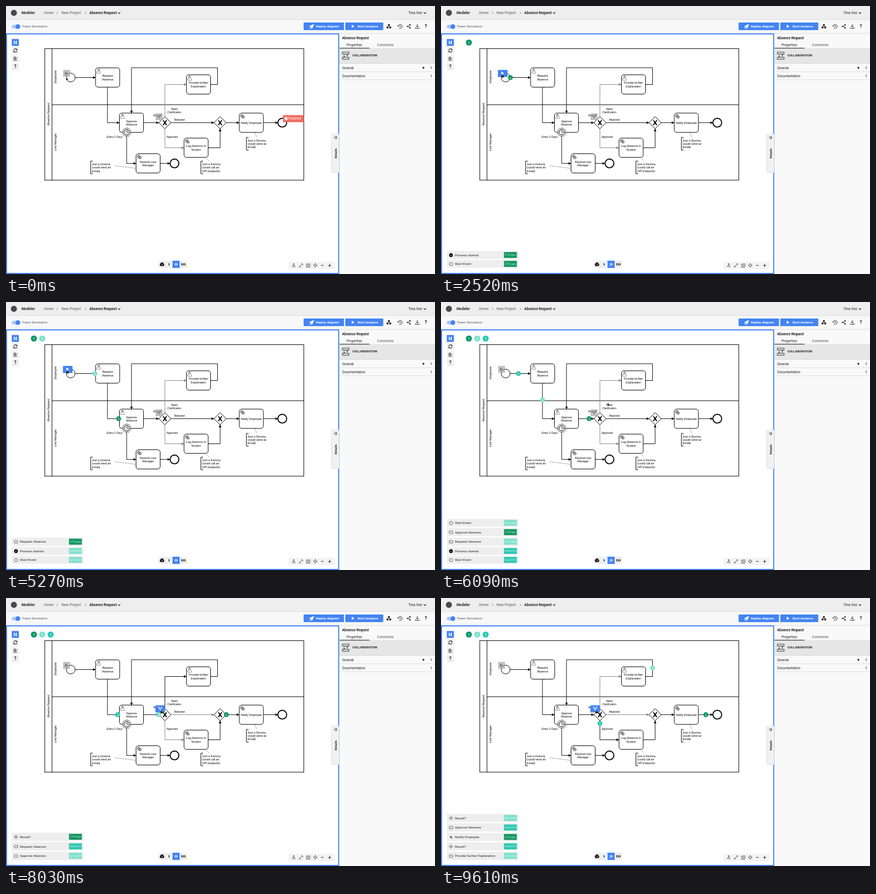
These frames come from a looping animation (800x500 px, 9640 ms). An HTML page:

```html
<!DOCTYPE html>
<html lang="en">
<head>
<meta charset="utf-8">
<title>Token simulation</title>
<style>
  html, body { margin: 0; width: 100%; height: 100%; overflow: hidden; background: #fff; }
  svg { display: block; width: 100vw; height: 100vh; }
  text { font-family: Roboto, "Open Sans", sans-serif; fill: #222; white-space: pre; }
  .bpmn text { font-family: "Liberation Sans", Arial, sans-serif; fill: #000; }
  text.mono { font-family: "Liberation Mono", "DejaVu Sans Mono", monospace; fill: #fff; }
</style>
</head>
<body>
<svg id="stage" viewBox="0 0 800 500"></svg>
<script>
const LOOP = 9640;
const BLUE = '#4383f4', INK = '#222', GREY = '#838383';
const stage = document.getElementById('stage');

// ---- drawing helpers -------------------------------------------------
const rect = (x, y, w, h, fill, extra = '') =>
  `<rect x="${x}" y="${y}" width="${w}" height="${h}" fill="${fill}" ${extra}/>`;
const circle = (x, y, r, fill, extra = '') =>
  `<circle cx="${x}" cy="${y}" r="${r}" fill="${fill}" ${extra}/>`;
const line = (d, stroke = INK, w = 1, extra = '') =>
  `<path d="${d}" fill="none" stroke="${stroke}" stroke-width="${w}" ${extra}/>`;
const shape = (d, fill = INK, extra = '') => `<path d="${d}" fill="${fill}" ${extra}/>`;
// y is the vertical middle of the capitals
const text = (x, y, s, size = 6.3, extra = '') =>
  `<text x="${x}" y="${y + size * 0.355}" font-size="${size}" ${extra}>${s}</text>`;
const MID = 'text-anchor="middle"', BOLD = 'font-weight="600"';
const at = (x, y, s, extra = '') => `<g transform="translate(${x} ${y})" ${extra}>${s}</g>`;
const lines = (x, y, rows, size, step, extra) =>
  rows.map((s, i) => text(x, y + i * step, s, size, extra)).join('');
const chevron = (x, y, color = INK, w = 1) => line(`M${x - 1.3} ${y - 2.3}l2.5 2.3l-2.5 2.3`, color, w);
const caret = (x, y) => line(`M${x - 2.2} ${y - 1.2}l2.2 2.3l2.2-2.3`, INK, 1.1);

// ---- model -----------------------------------------------------------
const flows = {
  start: [[129, 133.5], [167, 133.5]],
  request: [[189.2, 151.5], [189.2, 217.7], [211.5, 217.7]],
  approve: [[256.5, 217.7], [285, 217.7]],
  rejected: [[307.5, 217.7], [388, 217.7]],
  clarify: [[296.3, 206.5], [296.3, 146.5], [336.5, 146.5]],
  approved: [[296.3, 229], [296.3, 264.5], [332, 264.5]],
  log: [[377, 264.5], [399.3, 264.5], [399.3, 229]],
  merge: [[410.5, 217.7], [435, 217.7]],
  notify: [[480, 217.7], [507, 217.7]],
  provide: [[381.5, 146.5], [394.5, 146.5], [394.5, 115.2], [234, 115.2], [234, 200]],
  timer: [[225, 244], [225, 293.7], [242.5, 293.7]],
  remind: [[287.5, 293.7], [306, 293.7]]
};

// what the log says when a token leaves through a flow
const leaving = {
  start: ['event', 'Start Event'],
  request: ['task', 'Request Absence'],
  approve: ['task', 'Approve Absence'],
  rejected: ['gate', 'Result?'],
  clarify: ['gate', 'Result?'],
  approved: ['gate', 'Result?'],
  notify: ['gear', 'Notify Employee'],
  provide: ['task', 'Provide further Explanation']
};

const tokens = [
  { color: '#129660', id: '175cqws', legs: [['start', 2430], ['request', 3757], ['approve', 5365],
    ['rejected', 6530], ['merge', 7940], ['notify', 9050]], end: 10150 },
  { color: '#7fe0cc', id: '6ptyg6m', legs: [['start', 4180], ['request', 5417], ['approve', 6817],
    ['clarify', 8045], ['provide', 9440]], end: 11140 },
  { color: '#2cc7b1', id: '0e0pf2n', legs: [['start', 5572], ['request', 6755], ['approve', 8160],
    ['approved', 9380]], end: 10730 }
];

const events = tokens.flatMap(k => [
  { t: k.legs[0][1], kind: 'begin', name: 'Process started', k },
  ...k.legs.filter(([f]) => leaving[f]).map(([f, t]) => ({ t, kind: leaving[f][0], name: leaving[f][1], k }))
]).sort((a, b) => a.t - b.t);

// ---- diagram ---------------------------------------------------------
function flow(name) {
  const pts = flows[name], [x, y] = pts.at(-1), [px, py] = pts.at(-2);
  const turn = Math.atan2(y - py, x - px) * 180 / Math.PI;
  return `<g id="${name}" color="#000">` +
    line('M' + pts.join('L'), 'currentColor', 0.95, 'stroke-linejoin="round"') +
    `<path d="M.2 0l-4.9-2.4v4.8z" fill="currentColor" transform="translate(${x} ${y}) rotate(${turn})"/></g>`;
}

const gearAt = (x, y, r, bg = '#fff') =>
  circle(x, y, r, bg, `stroke="#333" stroke-width="${r * .5}" stroke-dasharray="${r * .42} ${r * .365}"`) +
  circle(x, y, r * .8, bg, 'stroke="#333" stroke-width=".6"') +
  circle(x, y, r * .35, bg, 'stroke="#333" stroke-width=".5"');
const person = line('M2.3 10v-2.2q.3-1.4 2.2-2h2.6q1.9.6 2.2 2v2.2z', '#333', .55) +
  circle(5.8, 4.2, 1.8, '#fff', 'stroke="#333" stroke-width=".55"') +
  shape('M4 3.9a1.8 1.8 0 0 1 3.6 0q-1.8-.9-3.6 0z', '#333');
const gears = gearAt(4.9, 5, 2.4) + gearAt(7.2, 7.2, 2.4);

const task = (x, y, icon, rows) => at(x, y,
  rect(0, 0, 45, 36, '#fff', 'rx="4.5" stroke="#000" stroke-width="1"') + icon +
  lines(22.5, 18.2 - (rows.length - 1) * 3.1, rows, 5.4, 6.2, MID));

const gateway = x => at(x, 217.7,
  shape('M0-11.3L11.3 0L0 11.3L-11.3 0z', '#fff', 'stroke="#000" stroke-width="1"') +
  line('M-3.2-4.4L3.2 4.4M3.2-4.4L-3.2 4.4', '#000', 1.9));

const note = (x, y, rows) => line(`M${x + 4} ${y}h-4v23.6h4`, '#000', 1) +
  lines(x + 2.3, y + 5.6, rows, 5.4, 6.3);

const upright = (x, y, s) => at(x, y, text(0, 0, s, 5.4, MID), 'style="rotate:0deg"')
  .replace(')"', ') rotate(-90)"').replace(' style="rotate:0deg"', '');

const clock = at(225, 235.6,
  circle(0, 0, 8, '#fff', 'stroke="#000" stroke-width=".8" stroke-dasharray="2.6 1.5"') +
  circle(0, 0, 6.5, 'none', 'stroke="#000" stroke-width=".7" stroke-dasharray="2.2 1.2"') +
  circle(0, 0, 4.8, '#fff', 'stroke="#000" stroke-width="1"') +
  line('M1.2-3.3L0 .2H2.8', '#000', .8));

const dotted = d => line(d, '#000', .9, 'stroke-dasharray=".9 1.6"');

const diagram = '<g class="bpmn">' +
  rect(72.3, 79.6, 483, 245.3, '#fff', 'stroke="#000" stroke-width="1"') +
  line('M85.8 79.6V325M85.8 184.2H555.3', '#000', 1) +
  upright(79, 202, 'Absence Request') + upright(92.3, 132, 'Employee') + upright(92.3, 254, 'Line Manager') +
  Object.keys(flows).map(flow).join('') +
  dotted('M203 298.2L242.5 302.8') + dotted('M372.5 282.5L379 290') + dotted('M463.8 236L467.5 244') +
  circle(120.6, 133.5, 8.2, '#fff', 'stroke="#000" stroke-width="1"') +
  circle(515.2, 217.7, 8.2, '#fff', 'stroke="#000" stroke-width="1.9"') +
  circle(314.2, 293.7, 8.2, '#fff', 'stroke="#000" stroke-width="1.9"') +
  task(167, 115.4, person, ['Request', 'Absence']) +
  task(336.5, 128.4, person, ['Provide further', 'Explanation']) +
  task(211.5, 199.8, person, ['Approve', 'Absence']) +
  task(435, 199.8, gears, ['Notify Employee']) +
  task(332, 246.4, gears, ['Log Absence in', 'System']) +
  task(242.5, 275.6, gears, ['Remind Line', 'Manager']) +
  gateway(296.3) + gateway(399.3) + clock +
  text(202.5, 244.3, 'Every 2 Days', 4.95, MID) +
  lines(313.8, 192.3, ['Need', 'Clarification'], 4.95, 5.9, MID) +
  text(323.3, 212.6, 'Rejected', 4.95, MID) + text(309.7, 244.4, 'Approved', 4.95, MID) +
  text(283, 204.2, 'Result?', 4.95, MID) +
  note(157.8, 289.4, ['Just a Dummy', '(could send an', 'Email)']) +
  note(363.5, 289.4, ['Just a Dummy', '(could call an', 'API Endpoint)']) +
  note(448.3, 245.2, ['Just a Dummy', '(could send an', 'Email)']) + '</g>';

// ---- application chrome ----------------------------------------------
const tool = (y, icon, on) => at(17.4, y, rect(-6.6, -6.6, 13.2, 13.2, on ? BLUE : '#efefef', 'rx=".8"') + icon);
const query = (x, y, size) => text(x, y, '?', size, MID + ' font-weight="700"');

const header =
  rect(0, 0, 800, 25.5, '#eeeeee') + rect(0, 25.5, 800, 25.5, '#f8f8f8') + line('M0 25.4H800', '#d6d6d6', .7) +
  circle(14.7, 12.7, 5.7, '#4a4a4a') +
  text(29, 12.9, 'Modeler', 6.7, BOLD) + text(71, 12.9, 'Home', 6.6, 'style="fill:#555"') +
  chevron(96, 12.9, '#777', .7) + text(103.7, 12.9, 'New Project', 6.7, 'style="fill:#555"') +
  chevron(148, 12.9, '#777', .7) + text(155.3, 12.9, 'Absence Request', 6.5, BOLD) + caret(211, 13) +
  text(776, 12.9, 'Tina Voe', 6.6, 'text-anchor="end"') + caret(781.3, 13) +
  rect(10.8, 35, 15, 7, '#a9c7f9', 'rx="3.5"') + circle(22.2, 38.5, 4.4, BLUE) +
  text(29.7, 38.2, 'Token Simulation', 6.2, 'style="fill:#555"') +
  rect(555, 30.8, 75.3, 14.2, BLUE, 'rx="1"') + rect(632.7, 30.8, 70.8, 14.2, BLUE, 'rx="1"') +
  shape('M574 34.2q-4-.3-5.8 2.6l-1.8.2l-1 1.6l1.7.2l2.2 2.2l.2 1.7l1.6-1l.2-1.8q2.900-1.700 2.700-5.700zM566.600 39.900l-.700 2.300l2.300-.700z', '#fff') +
  text(578, 37.9, 'Deploy diagram', 6.15, BOLD + ' style="fill:#fff"') +
  shape('M644.8 34.8v6.200l4.700-3.100z', '#fff') +
  text(655.3, 37.9, 'Start instance', 6.15, BOLD + ' style="fill:#fff"') +
  circle(714, 35.8, 2, INK) + circle(711.5, 39.900, 2, INK) + circle(716.5, 39.900, 2, INK) +
  line('M731.4 38a3.700 3.700 0 1 1 1.400 2.900M730 36.500l1.400 1.800l1.800-1.500M735 35.800v2.400l1.600 1', INK, .9) +
  line('M753.300 35.300L748.900 38L753.300 40.700', INK, .8) +
  [[753.3, 35.3], [748.9, 38], [753.3, 40.7]].map(p => circle(...p, 1.35, INK)).join('') +
  line('M767 34v5M764.6 36.900l2.400 2.400l2.400-2.400M763.500 40v1.500h7v-1.500', INK, 1) +
  query(783, 38, 8.6);

const palette =
  tool(68, rect(-2.700, -2.900, 1.900, 5.800, '#fff') + rect(.8, -2.900, 1.900, 5.800, '#fff'), true) +
  tool(83, line('M-3.200-.5a3.200 3.200 0 0 1 5.600-1.500M3.200.5a3.200 3.200 0 0 1-5.600 1.500', INK, 1.1) +
    shape('M3.600-3.600v2.900h-2.900zM-3.600 3.600v-2.900h2.900z')) +
  tool(98.300, line('M-3.200-2.700h4.400M-3.200-.9h6.400M-3.200.9h4.400M-3.200 2.700h6.400', INK, .95)) +
  tool(113.500, query(0, 0, 8.200));

const speeds = rect(284.300, 475.200, 53.800, 13.600, '#efefef', 'rx=".8"') +
  rect(310.600, 475.200, 13.200, 13.600, BLUE) +
  shape('M288 485.200a4 4 0 1 1 6 0z') + line('M291 483.300l2-2.500', '#fff', .8) +
  [[304, 1], [317.2, 2], [330.700, 3]].map(([x, n]) =>
    Array.from({ length: n }, (_, i) => line(`M${x + (i - (n - 1) / 2) * 3 - .9} 479.900l1.800 2.100l-1.800 2.100`,
      n === 2 ? '#fff' : INK, 1.2)).join('')).join('');

const zoomBar = rect(527, 477, 86, 14, '#f3f3f3', 'rx="1"') +
  line('M536.500 480.500v4.500M535.200 484.300q-1.700.400-1.700 1.200q0 .900 3 .900t3-.9q0-.800-1.700-1.200', INK, .7) +
  circle(536.500, 481.500, 1.100, INK) +
  line('M548.600 485.400l3-3M550.600 481h2.400v2.400M549.600 486.900h-2.400v-2.400', INK, .8) +
  line('M560.300 481.500l2-.7l2.400.8l2.300-.8v6l-2.300.8l-2.400-.8l-2 .7zM562.300 480.800v6M564.700 481.600v6', INK, .6) +
  circle(576.800, 483.800, 2.400, 'none', `stroke="${INK}" stroke-width=".7"`) +
  line('M576.800 480v2.100M576.800 485.500v2.100M573 483.800h2.100M578.500 483.800h2.100', INK, .7) +
  line('M587.500 484h5M600.800 484.100h5.400M603.500 481.400v5.400', INK, 1);

const sidebar = rect(622, 51, 178, 449, '#f9f9f9') + line('M622 51.200H800M622 79.300H800', '#d2d2d2', .7) +
  text(626.800, 59.300, 'Absence Request', 6.350, BOLD) +
  text(635, 73.200, 'Properties', 6.300) + text(691.800, 73.200, 'Comments', 6.300, 'style="fill:#555"') +
  rect(622, 78, 56, 1.300, '#333') +
  rect(622, 79.600, 178, 27.600, '#e6e6e6') +
  line('M627.200 86h12.600v3.600h-12.600zM627.200 95.700h12.600v3.600h-12.600z', INK, .9) +
  line('M630.500 89.600v6M636.500 89.600v6', INK, .8, 'stroke-dasharray="1.300 .7"') +
  shape('M629 93.200h3l-1.500 2.400zM635 92.200h3l-1.500-2.400z') +
  text(646, 92.400, 'COLLABORATION', 5.750, BOLD) +
  text(627, 115.300, 'General') + circle(778.400, 115.200, 1.700, INK) + chevron(793, 115.200, INK, .9) +
  text(627, 130.300, 'Documentation') + chevron(793, 130.300, INK, .9) +
  line('M622 107.300H800M622 122.700H800M622 137.600H800', '#d2d2d2', .7);

const detailsTab = shape('M621 238.500h-11.500q-3 0-3 3v66.500q0 3 3 3h11.500z', '#dcdcdc') +
  shape('M621 239h-11q-2.500 0-2.500 2.500v66q0 2.500 2.500 2.500h11z', '#f1f1f1') +
  line('M612 243.700h1M614 243.700h3.200M612 245.500h1M614 245.500h3.200M612 247.300h1M614 247.300h3.200', INK, .9) +
  `<g transform="translate(614.600 275) rotate(-90)">${text(0, 0, 'Details', 6, MID + ' ' + BOLD)}</g>`;

const finished = rect(516.600, 203.400, 38.900, 13.400, '#ee6f62', 'rx=".8"') + circle(522.300, 210, 2.900, '#fff') +
  line('M520.900 210.100l1.100 1.100l1.900-2.200', '#ee6f62', .8) +
  text(526.600, 210.100, 'Finished', 6.300, 'style="fill:#fff"');

// ---- overlay buttons -------------------------------------------------
const play = c => shape('M-2.800-3.300v6.600l5.400-3.300z', c);
const branch = c => line('M0 3.500V.9L-2.600-1.600M0 .9L2.600-1.600', c, 1.100) +
  shape('M-3.600-3.400h2.800l-2.800 2.800zM3.600-3.400h-2.800l2.800 2.800z', c);
const button = (id, x, y, icon) =>
  `<g id="${id}Off">${rect(x, y, 12.800, 12.800, '#a8a8a8', 'opacity=".72"')}${at(x + 6.400, y + 6.400, icon('#7d7d7d'))}</g>` +
  `<g id="${id}On">${rect(x - .4, y, 17.800, 13.200, BLUE, 'rx=".6"')}${at(x + 8.500, y + 6.400, icon('#fff'))}</g>`;

const badge = (k, r, size) => circle(0, 0, r, k.color) + text(0, .1, '1', size, MID + ' class="mono"');

const scopes = tokens.map((k, i) => `<g id="scope${i}" transform="translate(${52 + i * 15.600} 68.100)">${badge(k, 5.700, 6)}</g>`).join('');
const movers = tokens.map((k, i) => `<g id="token${i}">${badge(k, 4.600, 5.600)}</g>`).join('');

const arrow = shape('M0 0v6l1.500-1.300l1 2.200l1-.4l-1-2.200h2z', '#000', 'stroke="#fff" stroke-width=".4"');
const hand = shape('M-.6 0q.6-.7 1.200 0v2.500l2.700.7q.7.3.5 1.200l-.6 2.500h-3.200l-2-2.800q.3-.9 1.400 0z', '#000', 'stroke="#fff" stroke-width=".35"');

stage.innerHTML = rect(0, 0, 800, 500, '#fff') + header + sidebar + diagram +
  rect(1, 52, 619.400, 447, 'none', `stroke="${BLUE}" stroke-width="2"`) + detailsTab +
  palette + speeds + zoomBar + `<g id="finished">${finished}</g><g id="log"></g>` + scopes + movers +
  button('play', 106.600, 119.200, play) + button('pick', 279, 200.200, branch) +
  `<g id="cursor"><g id="arrow">${arrow}</g><g id="hand">${hand}</g></g>`;

const $ = Object.fromEntries([...stage.querySelectorAll('[id]')].map(n => [n.id, n]));
// tokens slide beneath the overlay buttons only while these are idle
const show = (id, on) => $[id].setAttribute('display', on ? 'inline' : 'none');
const move = (id, x, y) => $[id].setAttribute('transform', `translate(${x.toFixed(2)} ${y.toFixed(2)})`);

// ---- motion ----------------------------------------------------------
const ease = {
  inOut: p => (1 - Math.cos(p * Math.PI)) / 2,
  in: p => 1 - Math.cos(p * Math.PI / 2),
  out: p => Math.sin(p * Math.PI / 2),
  linear: p => p
};

function along(pts, p) {
  const len = pts.slice(1).map((q, i) => Math.hypot(q[0] - pts[i][0], q[1] - pts[i][1]));
  let d = p * len.reduce((a, b) => a + b), i = 0;
  while (i < len.length - 1 && d > len[i]) d -= len[i++];
  const kind = len.length === 1 ? 'inOut' : i === 0 ? 'in' : i === len.length - 1 ? 'out' : 'linear';
  const e = ease[kind](Math.min(1, d / len[i])), [a, b] = [pts[i], pts[i + 1]];
  return [a[0] + (b[0] - a[0]) * e, a[1] + (b[1] - a[1]) * e];
}

const cursorKeys = [[0, 112, 133], [1700, 112, 133], [2100, 113.500, 126.500], [5640, 113.500, 126.500],
  [6060, 310.500, 188], [6250, 310.500, 188], [6650, 289, 208.500], [LOOP, 289, 208.500]];

function cursorAt(t) {
  const i = cursorKeys.findIndex(k => k[0] > t);
  const [t0, x0, y0] = cursorKeys[i - 1], [t1, x1, y1] = cursorKeys[i];
  const e = ease.inOut((t - t0) / (t1 - t0));
  return [x0 + (x1 - x0) * e, y0 + (y1 - y0) * e];
}

// ---- log -------------------------------------------------------------
const rowHeight = { begin: 16.700, event: 16.700, task: 17.900, gate: 17.700, gear: 17.500 };
const logIcon = {
  begin: circle(0, 0, 3.500, '#000') + line('M-1.600 0l1.200 1.300l2-2.400', '#fff', .9),
  event: circle(0, 0, 3, 'none', 'stroke="#222" stroke-width=".7"'),
  task: rect(-3.100, -2.300, 6.200, 4.600, 'none', 'rx="1" stroke="#222" stroke-width=".7"'),
  gate: line('M0-3.300L3.300 0L0 3.300L-3.300 0z', INK, .7) + line('M-1-1L1 1M1-1L-1 1', INK, .8),
  gear: gearAt(-.4, -.4, 1.500, '#efefef') + gearAt(.7, .8, 1.500, '#efefef')
};

function logRow(e, y) {
  const h = rowHeight[e.kind] - 2.400;
  return at(0, y, rect(11, -h / 2, 133.500, h, '#eeeeee', 'rx=".8"') + at(18.600, .3, logIcon[e.kind]) +
    text(26, 0, e.name, 6.250) + rect(117.400, -5.600, 24, 11.200, e.k.color, 'rx="1"') +
    text(129.400, 0, e.k.id, 5, MID + ' class="mono" opacity=".75"'));
}

let logKey = '';
function drawLog(t) {
  const live = events.filter(e => t >= e.t && t < e.t + 2000).slice(-5);
  const key = live.map(e => e.t + e.name).join();
  if (key === logKey) return;
  logKey = key;
  let y = 481.200, html = '';
  for (let i = live.length - 1; i >= 0; i--) {
    html += logRow(live[i], y);
    if (i) y -= (rowHeight[live[i].kind] + rowHeight[live[i - 1].kind]) / 2;
  }
  $.log.innerHTML = html;
}

function render(t) {
  tokens.forEach((k, i) => {
    const n = k.legs.findLastIndex(l => t >= l[1]);
    show('scope' + i, n >= 0);
    show('token' + i, n >= 0);
    if (n < 0) return;
    const [name, from] = k.legs[n], to = n + 1 < k.legs.length ? k.legs[n + 1][1] : k.end;
    move('token' + i, ...along(flows[name], (t - from) / (to - from)));
  });

  const chosen = t < 7350 ? 'rejected' : t < 8600 ? 'clarify' : 'approved';
  for (const f of ['rejected', 'clarify', 'approved']) $[f].setAttribute('color', f === chosen ? '#000' : GREY);

  const onPlay = t > 1950 && t < 5720, onPick = t > 6560;
  show('playOn', onPlay); show('playOff', !onPlay);
  show('pickOn', onPick); show('pickOff', !onPick);
  show('hand', onPlay || onPick); show('arrow', !(onPlay || onPick));
  move('cursor', ...cursorAt(t));
  show('finished', t < 1300);
  drawLog(t);
}

const begin = performance.now();
function tick() {
  render((performance.now() - begin) % LOOP);
  requestAnimationFrame(tick);
}
tick();
</script>
</body>
</html>
```
